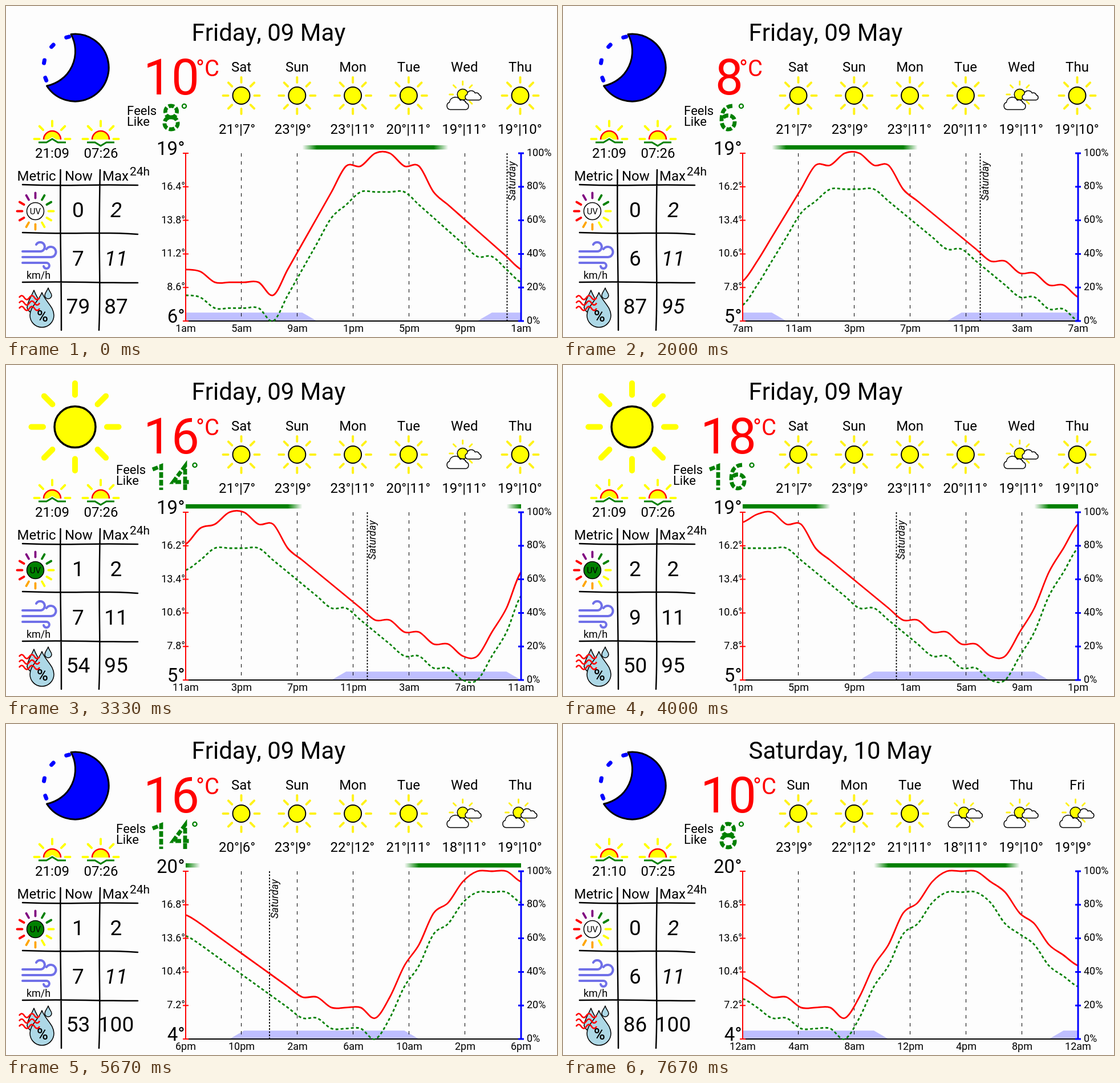
An HTML page that plays this animation: 966 by 580 pixels, repeating every 8000 ms.

```html
<!DOCTYPE html>
<html lang="en">
<head>
<meta charset="utf-8">
<title>Weather dashboard</title>
<style>
html, body { margin: 0; width: 100%; height: 100%; overflow: hidden; background: #fdfdfd; }
svg { display: block; width: 966px; height: 580px; font-family: Roboto, sans-serif; font-kerning: none; }
</style>
</head>
<body>
<svg id="stage" viewBox="0 0 966 580"></svg>
<script>
const stage = document.getElementById('stage');
const LEFT = 315, RIGHT = 903, TOP = 258, BASE = 552;
const HOUR = (RIGHT - LEFT) / 24, STEP = (RIGHT - LEFT) / 23;

// Hourly forecasts; index 0 is 1am. The later run replaces the tail at 6pm.
const temp = [10, 10, 9, 9, 9, 9, 8, 10, 12, 14, 16, 18, 18, 19, 19, 18, 18, 16, 15, 14, 13, 12, 11, 10,
  10, 9, 9, 8, 8, 7, 7, 9, 11, 14, 16, 18, 20, 20, 20, 19];
const feel = [8, 8, 7, 7, 7, 7, 6, 8, 10, 12, 14, 15, 16, 16, 16, 16, 15, 14, 13, 12, 11, 11, 10, 9,
  8, 7, 7, 6, 6, 5, 5, 7, 9, 12, 14, 16, 17, 18, 18, 17];
const lateTemp = temp.slice(0, 24).concat(
  [9, 8, 8, 7, 7, 7, 6, 8, 11, 13, 16, 17, 19, 20, 20, 20, 19, 18, 16, 15, 13, 12, 11]);
const lateFeel = feel.slice(0, 21).concat(
  [10, 9, 8, 7, 6, 6, 5, 5, 5, 4, 6, 9, 11, 14, 15, 17, 18, 18, 18, 17, 15, 14, 13, 11, 10, 9]);
const days = ['Sat', 'Sun', 'Mon', 'Tue', 'Wed', 'Thu', 'Fri'];
const ranges = ['21°|7°', '23°|9°', '23°|11°', '20°|11°', '19°|11°', '19°|10°'];
const lateRanges = ['20°|6°', '23°|9°', '22°|12°', '21°|11°', '18°|11°', '19°|10°', '19°|9°'];

const anchors = [1, 7, 11, 15, 18, 21, 24];
const humidity = [79, 87, 54, 46, 53, 71, 86];
const wind = [7, 6, 7, 11, 7, 6, 6];

function between(values, h) {
  const i = Math.max(1, anchors.findIndex(a => a >= h));
  const f = (h - anchors[i - 1]) / (anchors[i] - anchors[i - 1]);
  return Math.round(values[i - 1] + f * (values[i] - values[i - 1]));
}

const text = (x, y, s, size, extra = '') => `<text x="${x}" y="${y}" font-size="${size}" ${extra}>${s}</text>`;
const mid = 'text-anchor="middle"', end = 'text-anchor="end"', italic = 'font-style="italic"';
const path = (d, color, width, extra = '') =>
  `<path d="${d}" fill="none" stroke="${color}" stroke-width="${width}" ${extra}/>`;
const shape = (d, fill, width) => `<path d="${d}" fill="${fill}" stroke="#000" stroke-width="${width}" stroke-linejoin="round"/>`;
const circle = (x, y, r, fill, width, stroke = '#000') =>
  `<circle cx="${x}" cy="${y}" r="${r}" fill="${fill}" stroke="${stroke}" stroke-width="${width}"/>`;
const round = 'stroke-linecap="round"';

function rays(x, y, r1, r2, width, angles, color = () => '#ff0') {
  return angles.map((a, i) => {
    const c = Math.cos(a * Math.PI / 180), s = Math.sin(a * Math.PI / 180);
    return path(`M${x + r1 * c} ${y + r1 * s}L${x + r2 * c} ${y + r2 * s}`, color(i), width, round);
  }).join('');
}
const eight = [0, 45, 90, 135, 180, 225, 270, 315];
const lemon = () => '#fff21a';

const sun = (x, y) => rays(x, y, 23, 32, 4, eight, lemon) + circle(x, y, 15, '#ff0', 2);

const cloud = (x, y, k) => `<g transform="translate(${x} ${y}) scale(${k})">` +
  shape('M7 21.5A6 6 0 0 1 6 10A9 9 0 0 1 23 7A6.5 6.5 0 0 1 32 11A5.5 5.5 0 0 1 32 21.5Z', '#fff', 1.5 / k) + '</g>';

const partSun = x => rays(x - 3, 155, 17, 23, 3, eight, lemon) + circle(x - 3, 155, 9.5, '#ff0', 1.5) +
  cloud(x - 0.4, 146.8, .83) + cloud(x - 33, 157.5, 1.12);

const bigSun = rays(121, 108.5, 56, 76.5, 10, eight) + circle(121, 108.5, 36, '#ff0', 3.5);
const moon = shape('M114 49.5A59 59 0 1 1 71.5 140A62 62 0 0 0 114 49.5Z', '#00f', 3) +
  [158.6, 191, 224, 256.5].map(a =>
    `<path d="M-55-2.5V2.5" stroke="#00f" stroke-width="7" ${round} transform="translate(121 108) rotate(${a - 180})"/>`).join('');

function horizon(x, tip) {
  const line = `M${x - 24} 239H${x - 10}L${x} ${tip}L${x + 10} 239H${x + 24}`;
  return rays(x, 233, 22.5, 31.5, 4, [180, 225, 270, 315, 360]) +
    `<path d="M${x - 15} 234A15 15 0 0 1 ${x + 15} 234" fill="#ff0" stroke="red" stroke-width="2.5"/>` +
    path(line, '#fdfdfd', 6) + path(line, 'green', 3);
}

const rayColors = ['purple', 'purple', 'green', 'green', '#ff0', '#ff0', '#ff0', 'orange', 'orange', 'red', 'red', 'red'];
const uvIcon = on => rays(51.5, 359.5, 23, 32, 3.8, rayColors.map((c, i) => i * 30 - 120), i => rayColors[i]) +
  circle(51.5, 359.5, 15, on ? 'green' : '#fff', 1.5) + text(51.5, 365, 'UV', 15, mid);

const windIcon = path('M29 430H60A8 8 0 1 0 53 418M29 440H79A9 9 0 1 0 71 426M29 450H71A5 5 0 1 1 66 456',
  '#7070e8', 4, round);

const wave = y => path(`M23 ${y}q4.5-7 9 0t9 0t9 0t9 0`, 'red', 2.5);
const humidIcon = shape('M49 498C43 512 37 519 37 529A13 13 0 0 0 62 529C62 519 54 512 49 498Z', '#add8e6', 1.5) +
  shape('M74 494C71 501 68 503 68 507A6 6 0 0 0 80 507C80 503 76 501 74 494Z', '#add8e6', 1.5) +
  shape('M63 502C57 518 42 527 42 542A21 21 0 0 0 84 542C84 527 69 518 63 502Z', '#add8e6', 1.5) +
  wave(511) + wave(520.5) + wave(530) + text(64, 553, '%', 27, mid + ' font-weight="500"');

const tableLines = path('M29 313Q80 315 130 314T231 314M29 397Q90 399 140 398T231 400M29 484Q90 483 140 484T231 485' +
  'M95.5 287Q95 380 96 440T97 568M165 287Q163 380 164 450T163 568', '#000', 2.5, round);

const fixed = horizon(81, 233) + horizon(166, 245) + tableLines + windIcon + humidIcon +
  text(19.5, 306, 'Metric', 24) + text(103, 306, 'Now', 24) + text(169, 306, 'Max', 24) +
  text(217, 296.5, '24h', 21) + text(57, 478, 'km/h', 18, mid);

// Centre lines of the broken digits, 37 units apart
const strokes = [
  'M18.5 3C8 3 7 13 7 23.5S8 44 18.5 44 30 34 30 23.5 29 3 18.5 3Z',
  'M6 11L21 5V47',
  'M7 15C7-1 30 0 29 14C28 24 15 34 8 44H32',
  'M7 13C9-1 30 0 29 13C28 22 22 23 15 23C24 23 31 26 30 34C29 47 8 48 7 33',
  'M26 47V5L5 33H35',
  'M29 3H12L9 24C18 16 31 21 30 32C29 47 9 48 7 34',
  'M26 3C12 4 7 13 7 28C7 50 30 48 30 31C30 16 10 17 7 28',
  'M5 3H31L14 47',
  'M18.5 23C5 23 5 3 18.5 3S32 23 18.5 23C3 23 3 44 18.5 44S34 23 18.5 23Z',
  'M11 44C25 43 30 34 30 19C30-2 7-2 7 16C7 31 27 31 30 19'
];

function feelsLike(value) {
  const s = String(value), two = s.length > 1, x = two ? 251 : 271, label = two ? 193 : 212;
  return text(label, 191, 'Feels', 22) + text(label, 210, 'Like', 22) +
    [...s].map((d, i) => path(strokes[d], 'green', 6.8,
      `stroke-dasharray="10 3.5" transform="translate(${x + 37 * i} 172)"`)).join('') +
    circle(two ? 331 : 312.5, 175.5, 3.6, 'none', 2.3, 'green');
}

function nowTemp(value) {
  const two = value > 9, x = two ? 241 : 267;
  return `<g fill="red">${text(x, 155, value, 87)}${text(two ? 333 : 309, 123, '°C', 40)}</g>`;
}

function curve(values, toY) {
  const v = values.slice();
  v[0] = (5 * values[0] + values[1]) / 6;
  v[1] = (values[0] + 4 * values[1] + values[2]) / 6;
  const p = v.map((n, i) => [LEFT + i * STEP, toY(n)]);
  let d = 'M' + p[0];
  for (let i = 0; i < p.length - 1; i++) {
    const a = p[i - 1] || p[i], b = p[i], c = p[i + 1], e = p[i + 2] || c;
    d += `C${b[0] + STEP / 3} ${b[1] + (c[1] - a[1]) / 6} ${c[0] - STEP / 3} ${c[1] - (e[1] - b[1]) / 6} ${c}`;
  }
  return d;
}

const clock = h => ((h + 11) % 12 + 1) + (h % 24 < 12 ? 'am' : 'pm');
const isBright = h => h % 24 >= 10 && h % 24 <= 18;
const isWet = h => h % 24 > 21 || h % 24 < 10;

function chart(h, temps, feels) {
  const t = temps.slice(h - 1, h + 23), f = feels.slice(h - 1, h + 23);
  const lo = Math.min(...f), hi = Math.max(...t);
  const toY = n => BASE - (n - lo) / (hi - lo) * (BASE - TOP);
  let stops = '', wet = `M${LEFT} ${BASE}`, out = '';
  for (let k = 0; k < 24; k++) {
    stops += `<stop offset="${k / 23}" stop-color="green" stop-opacity="${+isBright(h + k)}"/>`;
    wet += `L${LEFT + k * STEP} ${isWet(h + k) ? 537.3 : BASE}`;
  }
  out += `<linearGradient id="bright">${stops}</linearGradient>` +
    `<rect x="${LEFT}" y="244" width="${RIGHT - LEFT}" height="7.5" fill="url(#bright)"/>` +
    `<path d="${wet}V${BASE}Z" fill="#bfbfff"/>`;
  for (let j = 1; j < 6; j++) out += path(`M${LEFT + j * 98 - 0.5} ${TOP}V${BASE}`, '#000', 1, 'stroke-dasharray="6 8"');
  if (h < 24) {
    const x = LEFT + (24 - h) * HOUR;
    out += path(`M${x} ${TOP}V${BASE}`, '#000', 1.8, 'stroke-dasharray="3 2.5"') +
      text(0, 0, 'Saturday', 18, `${italic} transform="translate(${x + 14.5} 341) rotate(-90)"`);
  }
  out += path(`M${LEFT} ${BASE}H${RIGHT}`, '#000', 2) +
    path(curve(f, toY), 'green', 2.8, 'stroke-dasharray="5 4"') + path(curve(t, toY), 'red', 2.8);
  let red = `M${LEFT} ${TOP}V${BASE}`, blue = `M${RIGHT} ${TOP}V${BASE}`;
  for (let j = 0; j < 6; j++) {
    const y = BASE - j * 58.8, value = lo + (hi - lo) * j / 5;
    red += `M${LEFT - 5} ${y}h10`;
    blue += `M${RIGHT - 5} ${y}h10`;
    out += j % 5 ? text(314, y + 5, value.toFixed(1) + '°', 18, end)
      : text(313.5, y + 2.5, value + '°', 33, end);
    out += text(913, y + 4.5, j * 20 + '%', 18);
  }
  for (let j = 0; j < 7; j++) out += text(LEFT + j * 98, 571, clock(h + j * 4), 18, mid);
  return out + path(red, 'red', 2) + path(blue, '#00f', 3);
}

function forecast(h) {
  const late = h >= 18, skip = h >= 24 ? 1 : 0;
  let out = '';
  for (let i = 0; i < 6; i++) {
    const x = 412.5 + i * 97.8, d = i + skip;
    const cloudy = late ? d > 3 : d === 4;
    out += text(x, 115, days[d], 24, mid) + (cloudy ? partSun(x) : sun(x, 157)) +
      text(x - 39.5, 224, (late ? lateRanges : ranges)[d], 24);
  }
  return out;
}

function metrics(h) {
  const uv = isBright(h) ? (h > 12 && h < 17 ? 2 : 1) : 0;
  const maxHumid = h < 5 ? 87 : h < 18 ? 95 : 100;
  const row = (y, now, max, slant) => text(126.5, y, now, 37, mid) + text(193, y, max, 37, mid + (slant ? ' ' + italic : ''));
  return uvIcon(uv > 0) + row(370, uv, 2, !uv) +
    row(454.5, between(wind, h), 11, h < 9 || h > 16) +
    row(538.5, between(humidity, h), maxHumid, h > 4 && h < 9);
}

function draw(h) {
  const temps = h < 18 ? temp : lateTemp, feels = h < 18 ? feel : lateFeel, next = h >= 24;
  stage.innerHTML = fixed + (h > 7 && h < 18 ? bigSun : moon) +
    text(325.5, 61, next ? 'Saturday, 10 May' : 'Friday, 09 May', 42) +
    text(81, 266, next ? '21:10' : '21:09', 24, mid) + text(166.5, 266, next ? '07:25' : '07:26', 24, mid) +
    nowTemp(temps[h - 1]) + feelsLike(feels[h - 1]) + forecast(h) + metrics(h) + chart(h, temps, feels);
}

let shown = 0;
function tick() {
  const t = performance.now() % 8000;
  const hour = 1 + Math.floor((Math.floor(t / 10) + 0.5) * 0.03);
  if (hour !== shown) draw(shown = hour);
  requestAnimationFrame(tick);
}
tick();
</script>
</body>
</html>
```
